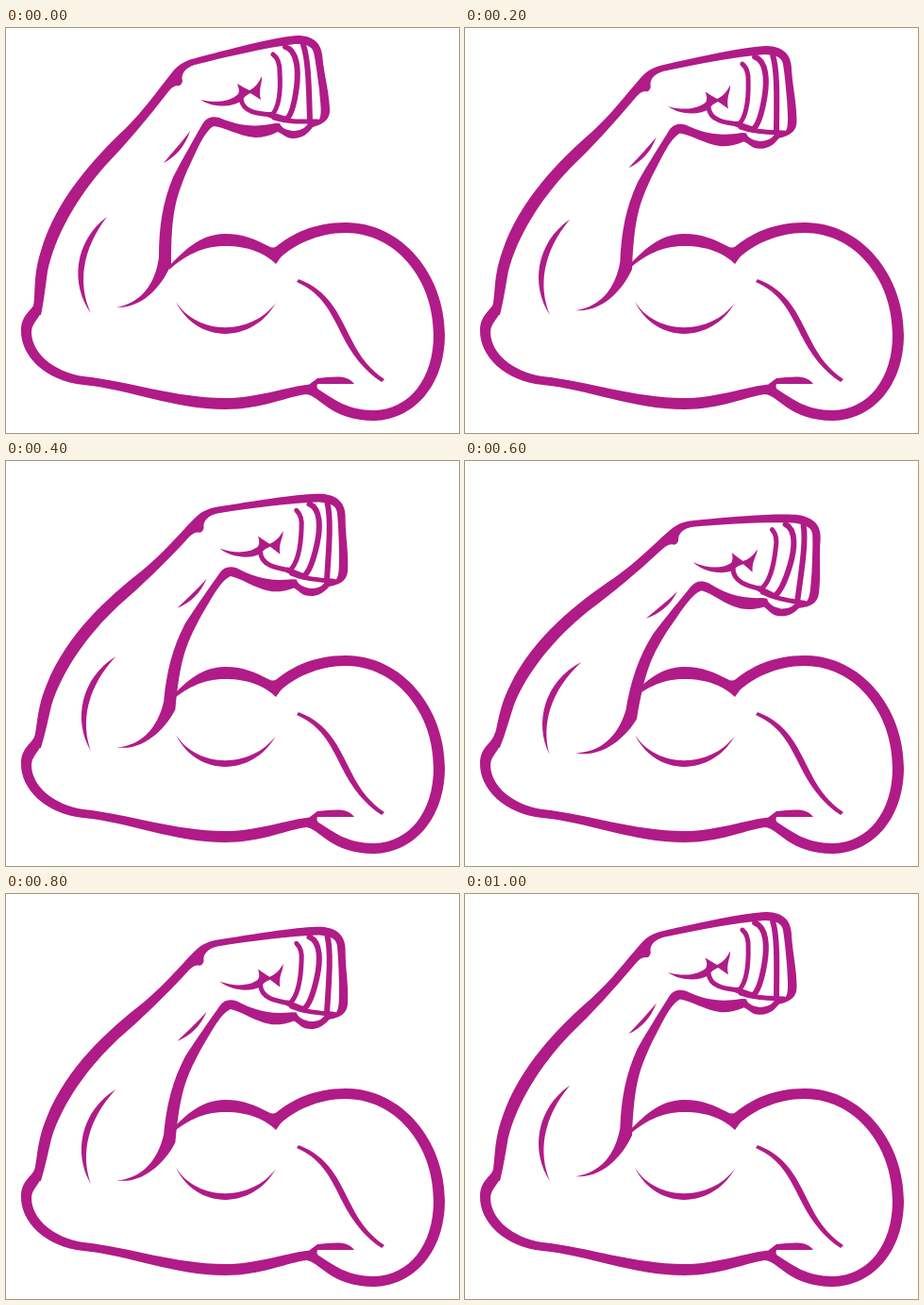
Write an HTML page that moves like this. It is 480 px wide and 429 px high and loops after 1200 ms.

```html
<!DOCTYPE html>
<html lang="en">
<head>
<meta charset="utf-8">
<title>Flexing arm</title>
<style>
  html, body { margin: 0; width: 100%; height: 100%; overflow: hidden; background: #fff; }
  svg { display: block; width: 100%; height: 100%; }
</style>
</head>
<body>
<svg viewBox="0 0 480 429" fill="#b01b87">
  <!-- upper arm and shoulder -->
  <path d="M32 287C30 299 16 302 16 320C15 347 42 374 82 378C128 382 178 404 232 404C270 404 300 390 318 388
    C332 389 344 416 390 416C432 415 465 379 465 325C465 262 420 206 360 206C325 206 302 219 287 231Q283 234 278 231
    C264 224 252 218 232 218C205 218 187 238 173 252V256C190 241 208 231 232 231C258 231 275 239 286 250
    L291 243C305 230 330 217 360 217C412 217 453 265 453 325C453 371 428 404 390 405C362 405 347 393 333 384
    Q328 382 330 377C310 376 270 392 232 392C180 392 130 374 82 369C50 364 27 344 27 322C27 312 36 308 38 298Z"/>
  <path d="M318 386L322 377L330 371C345 370 361 366 369 377H330Z"/>
  <path d="M180 290C203 326 260 326 286 291C262 334 203 336 180 290Z"/>
  <path d="M310 266C342 278 352 302 366 330C376 350 386 362 401 372L398 375C380 364 366 345 356 325
    C343 298 333 280 308 269Z"/>

  <g id="forearm">
    <path id="skin" fill="#fff"/>
    <path id="outline"/>
    <path d="M167 143C180 136 190 125 195 109C188 119 177 131 167 143Z"/>
    <path d="M107 200C72 226 68 272 90 302C76 272 80 235 107 200Z"/>
    <!-- thumb and fingers -->
    <path d="M206 76C222 80 238 78 246 70C248 66 246 62 245 59C250 62 254 64 258 66C264 63 268 58 271 51
      C272 58 267 64 270 76L259 69C255 71 252 73 250 77C240 84 220 85 206 76Z"/>
    <g fill="none" stroke="#b01b87" stroke-width="5" stroke-linecap="round">
      <path d="M249 75C251 90 268 91 282 92C291 82 291 62 290 46C290 36 287 31 283 28"/>
      <path d="M296 20C309 24 310 45 308 62C306 78 303 92 297 97L280 92" stroke-width="6"/>
      <path d="M315 18C321 35 321 70 322 98" stroke-width="6"/>
      <path d="M284 95C300 100 315 99 330 99"/>
    </g>
  </g>
</svg>
<script>
const $ = id => document.getElementById(id);
const outer = `M27 304C33 285 27 268 37 236C53 182 92 139 127 106C147 86 160 67 176 47C184 37 192 34 204 31
  C250 19 285 10 308 8C325 8 333 15 335 28C337 50 342 65 343 85C344 98 335 102 325 105C320 112 314 117 304 117
  C297 117 293 112 288 110C280 114 272 116 264 116C245 114 232 105 220 104C209 110 200 135 192 151
  C180 180 175 195 175 250C168 268 148 297 117 296`;
const inner = `C143 291 158 272 162 243C162 210 166 185 177 158C189 135 199 118 208 102C212 95 218 93 226 95
  C245 103 262 106 285 101L290 101C292 107 300 109 306 109C314 108 318 105 320 101L330 99C336 95 333 80 332 66
  C330 50 328 35 326 26C324 18 316 17 306 17C275 21 235 30 200 39C190 42 185 49 187 56Q186 62 181 61C176 62 174 65 170 70
  C150 96 128 122 105 146C75 180 52 220 44 258C41 280 40 290 37 304Z`;
$("outline").setAttribute("d", outer + inner);
$("skin").setAttribute("d", "M117 296" + inner);

const angles = [0, 2.3, 5.4, 9.6, 5.4, 2.3];
const stepMs = 200;

function draw(now) {
  const angle = angles[Math.floor(now / stepMs) % angles.length];
  $("forearm").setAttribute("transform", `rotate(${angle} 38 303)`);
  requestAnimationFrame(draw);
}
draw(performance.now());
</script>
</body>
</html>
```
